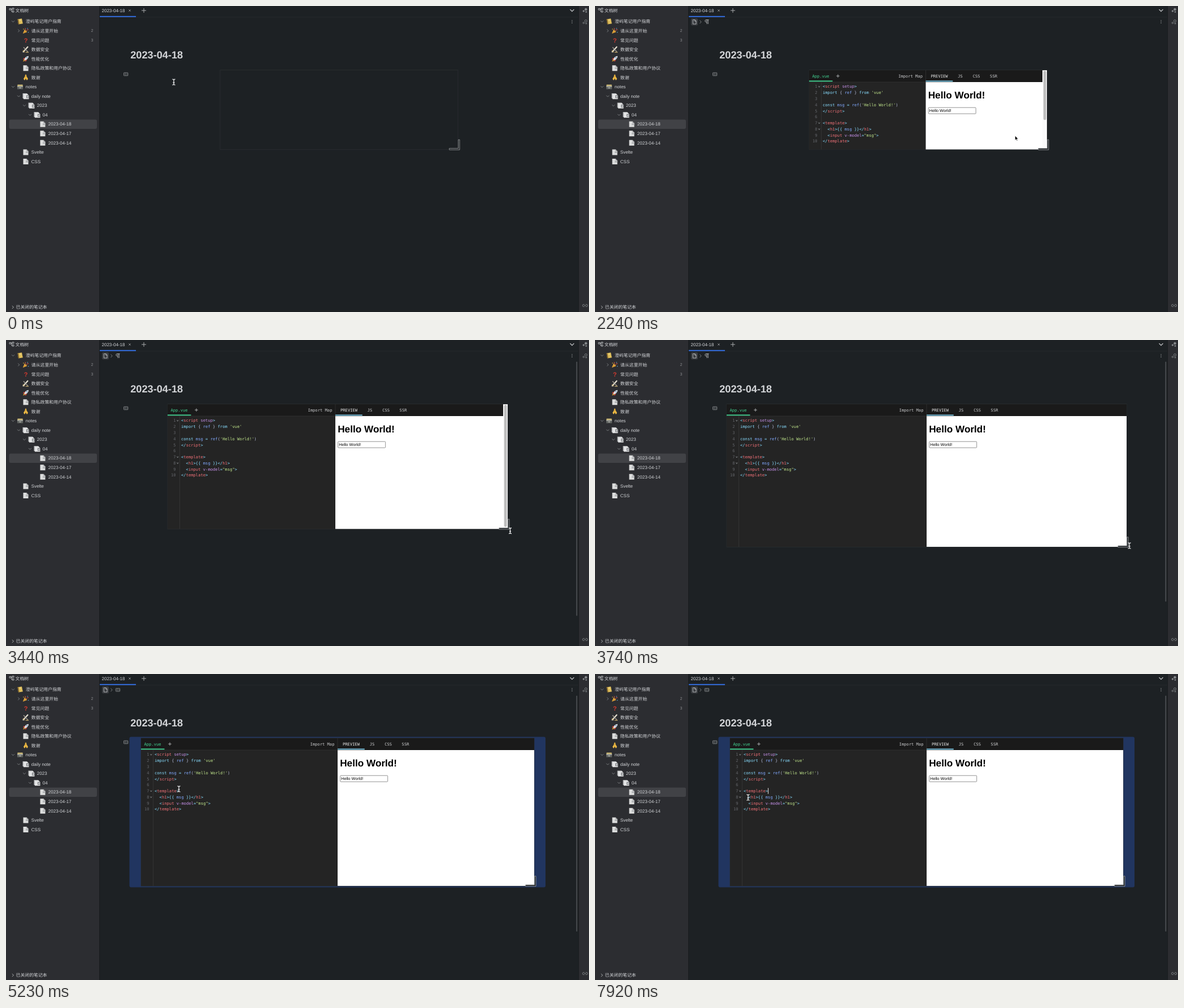
Write an HTML page that moves like this. It is 1032x543 px and loops after 8 s.

```html
<!DOCTYPE html>
<html lang="zh-CN">
<head>
<meta charset="utf-8">
<title>Resizable playground block</title>
<style>
  html, body { margin: 0; width: 100%; height: 100%; overflow: hidden; background: #1d2124; }
  svg { display: block; width: 100%; height: 100%; }
  text {
    font: 8px "Liberation Sans", "Noto Sans CJK SC", "Noto Sans CJK", sans-serif;
    fill: #d3d5d8; white-space: pre; text-rendering: geometricPrecision;
  }
  .mono, .mono text { font: 7.17px "DejaVu Sans Mono", monospace; }
  .line { fill: none; stroke: #b9bbbe; stroke-width: .9; }
  .dim { fill: none; stroke: #85888b; stroke-width: .9; }
</style>
</head>
<body>
<svg viewBox="0 0 1032 543" preserveAspectRatio="none">
  <defs>
    <g id="page">
      <path d="M-4.5-5H1.5L4.5-2V5H-4.5Z" fill="#dcdddd"/>
      <path d="M1.5-5L4.5-2H1.5Z" fill="#8b8d90"/>
      <path d="M0-1H4.5V1.5H0Z" fill="#aeb0b2"/>
    </g>
    <g id="pages">
      <path d="M-5.5-5H2.5V4H-5.5Z" fill="#b9bbbd"/>
      <path d="M-4-4H3L5.5-1V5.2H-4Z" fill="#e2e3e4"/>
      <path d="M1-1.5H5.5V3.5H1Z" fill="#777a7e"/>
      <path d="M2.2-.3H4.5V2.5H2.2Z" fill="#dadbdd"/>
    </g>
    <g id="book">
      <path d="M-4.5-4L3-5.2L4.8 3.8L-3 5.2Z" fill="#dfbf5c"/>
      <path d="M-4.5-4L-3-4.3L-1.4 4.9L-3 5.2Z" fill="#8a6a2c"/>
      <path d="M-1-2L2-2.5" stroke="#f4e2a1"/>
    </g>
    <g id="party">
      <path d="M-5.2 5L-2-2.5L2.6 2Z" fill="#e9b13c"/>
      <path d="M-3.8 1.8L-.8 3.5M-2.5-1L1 2.2" stroke="#b2642c" stroke-width=".8"/>
      <path d="M-1.5-5q2 1 .8 3M1 0q2-3 4-2" fill="none" stroke="#e5574d"/>
      <path d="M2.5-5h1.3v1.3H2.5zM4 2h1.2v1.2H4z" fill="#63b5e8"/>
      <circle cx="-4" cy="-3" r=".8" fill="#e5b73a"/>
    </g>
    <g id="ask"><text y="4" text-anchor="middle" style="font-size:11px;font-weight:700;fill:#d23a2f">?</text></g>
    <g id="safe">
      <path d="M-5 5L4-5" stroke="#e6e1d2" stroke-width="2.2"/>
      <path d="M-4-4L4 4.5" stroke="#a9a398" stroke-width="1.4"/>
      <path d="M-5 1.5L-1.5 5M0 5H5" stroke="#cdb06b" stroke-width="1.2"/>
    </g>
    <g id="rocket">
      <path d="M5-5Q0-5-3 1L-1 3Q5 0 5-5Z" fill="#dfe2e6"/>
      <path d="M-1-2L-4-1L-5 2L-2 0ZM2 1L1 4L-2 5L0 2Z" fill="#d34a3f"/>
      <path d="M-3 1L-1 3L-5 5Z" fill="#efa735"/>
      <circle cx="2" cy="-2" r="1.1" fill="#5a87b4"/>
    </g>
    <g id="thanks">
      <path d="M0-5.3Q1.3-5.3 1.4-2L4 2.5L2 5.3L0 2L-2 5.3L-4 2.5L-1.4-2Q-1.3-5.3 0-5.3Z" fill="#f0bd45"/>
      <path d="M0-4V2" stroke="#bd862a" stroke-width=".6"/>
    </g>
    <g id="box">
      <path d="M-4.5-4H4.5L5-1H-5Z" fill="#d2bd76"/>
      <path d="M-5-1.5H5V4.3H-5Z" fill="#5e625f"/>
      <path d="M-5-1.5H5V.3H-5Z" fill="#a8aaa3"/>
      <path d="M-1.5 2H1.5" stroke="#d8d8d2"/>
    </g>
    <g id="frame" class="dim">
      <rect x="-3.7" y="-2.7" width="7.4" height="5.4" rx=".7"/>
      <path d="M-1-2.5V2.5M-2.8 0H-1M.6-.8H3M.6 1H3" stroke-width=".7"/>
    </g>
  </defs>

  <rect width="1032" height="543" fill="#1d2124"/>
  <rect width="165" height="543" fill="#2c2d31"/>
  <rect x="1014" width="18" height="543" fill="#2c2d31"/>
  <path d="M165.5 0V543M1013.5 0V543" stroke="#191b1e"/>
  <path d="M166 19.8H1013" stroke="#2a2d30" stroke-width=".8"/>
  <rect x="166" y="17.8" width="64" height="1.8" fill="#3575f0"/>
  <g class="line">
    <path d="M6 4.5H9V7H6ZM11 3.8H14V6H11ZM11 8.7H14V11H11ZM9 5.5H11M10 5.5V10H11"/>
    <path d="M10.8 532L13.6 534.5L10.8 537"/>
    <path d="M217.3 6.3L220.7 9.7M220.7 6.3L217.3 9.7" stroke-width=".7"/>
    <path d="M240 8H248M244 4V12"/>
    <path d="M998.5 6L1002 9.5L1005.500 6" stroke-width="1.3"/>
    <path d="M1002 25V31" stroke-dasharray="1.2 1.2"/>
  </g>
  <g class="dim">
    <circle cx="1026.500" cy="6" r="1.900" fill="#85888b"/><circle cx="1022.500" cy="9" r="1.300" fill="#85888b"/><circle cx="1027" cy="10.500" r="1" fill="#85888b"/>
    <circle cx="1026.500" cy="26.500" r="2"/><circle cx="1022.500" cy="30" r="1.300"/><circle cx="1027" cy="31" r="1"/>
    <path d="M1024 529.500H1022.500a2 2 0 0 0 0 4H1024M1026 529.500H1027.500a2 2 0 0 1 0 4H1026M1023 531.500H1027"/>
  </g>
  <text x="16.500" y="10.500" style="font-size:7.900px">文档树</text>
  <text x="17.500" y="537.400" style="font-size:7.900px">已关闭的笔记本</text>
  <text x="169.500" y="10.700">2023-04-18</text>
  <g id="tree"></g>

  <text x="220.200" y="93.200" style="font-size:18.200px;font-weight:700">2023-04-18</text>
  <use href="#frame" x="212.200" y="121"/>
  <g id="crumb">
    <rect x="170" y="22" width="12" height="12.500" rx="2" fill="#3a3d41"/>
    <path class="line" d="M173.300 24.500H177L179 26.500V32H173.300ZM176.800 24.500V27H179"/>
    <path class="dim" d="M185.500 25.500L188 28.200L185.500 31"/>
    <g id="para"><path class="line" d="M201.500 24.500H196.800a2 2 0 0 0 0 4H198M198 24.500V32M200.200 24.500V32"/></g>
    <use id="block" href="#frame" x="198" y="28.200"/>
  </g>

  <rect id="mark" x="218.500" y="111.600" width="736.500" height="267" rx="3" fill="#213560"/>
  <rect id="edge" y="113.700" fill="#1d2124" stroke="#2c2f32" stroke-width=".8"/>
  <g id="panel" class="mono">
    <rect id="head" y="114" height="21" fill="#1a1a1a"/>
    <rect id="code" y="135" fill="#242424"/>
    <path id="rule" stroke="#383838" stroke-width=".7"/>
    <rect id="white" y="135" fill="#fff"/>
    <g id="left"></g>
    <g id="strip">
      <rect x="-8.500" y="135" width="8.500" height="119.500" fill="#fff"/>
      <path d="M0 135V254.500" stroke="#444"/>
    </g>
    <g id="right"></g>
    <rect id="track" y="114" width="8" fill="#fafafa"/>
    <rect id="thumb" y="115" width="4.800" rx="2.400" fill="#bdbdbd"/>
  </g>
  <path id="grip" d="M.7-17.300H3V.7H-15.300V-1.900H.7Z" fill="#1d2124" stroke="#a3a5a7" stroke-width=".8"/>
  <rect id="scroll" x="1009.500" y="38.500" width="1.700" rx=".8" fill="#505356"/>
  <path id="beam" d="M-2.500-5Q0-5 0-3.500Q0-5 2.500-5M0-3.500V3.500M-2.500 5Q0 5 0 3.500Q0 5 2.500 5M-1.500 1H1.500" fill="none" stroke="#e4e5e6" stroke-width="1.300"/>
  <path id="arrow" d="M0 0V8L1.900 6.300L3.200 9.200L4.500 8.600L3.200 5.800H5.700Z" fill="#000" stroke="#fff" stroke-width=".7"/>
</svg>
<script>
const $ = id => document.getElementById(id);

function el(parent, tag, attrs, text) {
  const n = document.createElementNS('http://www.w3.org/2000/svg', tag);
  set(n, attrs);
  if (text) n.textContent = text;
  return parent.appendChild(n);
}
function set(n, attrs) {
  for (const key in attrs) n.setAttribute(key, attrs[key]);
}
const show = (n, on) => { n.style.display = on ? '' : 'none'; };
const move = (n, x, y = 0) => n.setAttribute('transform', `translate(${x} ${y})`);

// Sidebar: depth, icon, label, arrow (v open, > closed), count
const rows = [
  [0, 'book', '澄屿笔记用户指南', 'v'], [1, 'party', '请从这里开始', '>', '2'],
  [1, 'ask', '常见问题', '', '3'], [1, 'safe', '数据安全'], [1, 'rocket', '性能优化'],
  [1, 'page', '隐私政策和用户协议'], [1, 'thanks', '致谢'], [0, 'box', 'notes', 'v'],
  [1, 'pages', 'daily note', 'v'], [2, 'pages', '2023', 'v'], [3, 'pages', '04', 'v'],
  [4, 'page', '2023-04-18'], [4, 'page', '2023-04-17'], [4, 'page', '2023-04-14'],
  [1, 'page', 'Svelte'], [1, 'page', 'CSS']
];
const tree = $('tree');
el(tree, 'rect', { x: 5.5, y: 201.6, width: 155.5, height: 16.4, rx: 3, fill: '#414246' });
rows.forEach(([depth, icon, label, arrow, count], i) => {
  const x = depth * 10, y = 27.4 + i * 16.57;
  if (arrow) {
    const d = arrow === 'v' ? 'M-2.4-1.2L0 1.2L2.4-1.2' : 'M-1.2-2.4L1.2 0L-1.2 2.4';
    move(el(tree, 'path', { d, class: 'dim' }), x + 12.5, y);
  }
  el(tree, 'use', { href: '#' + icon, x: x + 25, y });
  const cjk = label.charCodeAt(0) > 255;
  el(tree, 'text', { x: x + 34.8, y: y + (cjk ? 3 : 2.8), style: cjk ? 'font-size:7.9px' : '' }, label);
  if (count) el(tree, 'text', { x: 152.5, y: y + 2.5, 'text-anchor': 'middle', style: 'font-size:7px;fill:#8b8d90' }, count);
});

// Editor code: color key, then text, parts split by ~
const ink = { c: '#89ddff', r: '#f07178', p: '#c792ea', g: '#c3e88d', b: '#82aaff', w: '#b4bad6' };
const code = [
  'c:<~r:script~p: setup~c:>',
  "c:import~w: { ~b:ref~w: } ~c:from~g: 'vue'",
  '',
  "c:const~b: msg~c: = ~b:ref~w:(~g:'Hello World!'~w:)",
  'c:</~r:script~c:>',
  '',
  'c:<~r:template~c:>',
  'c:  <~r:h1~c:>{{~b: msg ~c:}}</~r:h1~c:>',
  'c:  <~r:input~p: v-model~c:=~g:"msg"~c:>',
  'c:</~r:template~c:>'
];
const COL = 4.317, lineY = i => 142.9 + i * 10.78;
const left = $('left'), right = $('right');
const label = (g, x, y, s, color, anchor = 'start') =>
  el(g, 'text', { x, y, 'text-anchor': anchor, style: 'fill:' + color }, s);

const select = el(left, 'rect', { y: 169.8, height: 11, fill: '#43484a' });
label(left, 5.5, 126.6, 'App.vue', '#42d392');
el(left, 'rect', { x: 0, y: 132.4, width: 41.5, height: 1.8, fill: '#42d392' });
el(left, 'path', { d: 'M48.2 124.2H53.8M51 121.4V127', class: 'line' });
const gutter = el(left, 'path', { stroke: '#3a3a3a', 'stroke-width': .8 });
code.forEach((line, i) => {
  const y = lineY(i) + 2.5;
  label(left, 14.6, y, String(i + 1), '#63656a', 'end');
  const text = el(left, 'text', { x: 24, y });
  if (line) for (const part of line.split('~'))
    el(text, 'tspan', { style: 'fill:' + ink[part[0]] }, part.slice(2));
});
const folds = el(left, 'g', { class: 'dim' });
[0, 6, 7].forEach(i => move(el(folds, 'path', { d: 'M-1.3-1L0 1.4L1.3-1' }), 17.8, lineY(i)));
const caret = el(left, 'rect', { x: 24 + 10 * COL, y: 202.3, width: .9, height: 10.4, fill: '#fff' });

label(right, -5.5, 126.6, 'Import Map', '#c9cacc', 'end');
[['PREVIEW', 9, '#e8e8e8'], ['JS', 56.7], ['CSS', 83.2], ['SSR', 113.6]].forEach(
  ([s, x, color]) => label(right, x, 126.6, s, color || '#c9cacc'));
el(right, 'rect', { x: 0, y: 132.6, width: 47.8, height: 1.6, fill: '#89ddff' });
const result = el(right, 'g', {});
const sans = 'font-family:"Liberation Sans",sans-serif;fill:#000;';
el(result, 'text', { x: 4.2, y: 163.8, style: sans + 'font-size:17.2px;font-weight:700' }, 'Hello World!');
el(result, 'rect', { x: 4.7, y: 180.2, width: 84, height: 11, rx: 1, fill: '#fff', stroke: '#777', 'stroke-width': .8 });
el(result, 'text', { x: 6.3, y: 188.2, style: sans + 'font-size:7.17px' }, 'Hello World!');

// Poses by step: [step, ...values], linear in between
const pointer = [
  [0, 297, 135], [2, 302, 136], [4, 400, 155], [8, 599, 194], [9, 615, 198], [16, 795, 243],
  [18, 799, 246], [20, 799, 246], [21, 839, 312], [25, 946, 365], [27, 948, 372], [29, 939.5, 376],
  [30, 938, 373], [35, 306, 204], [42, 421, 176], [44, 321, 171], [46, 268, 165], [49, 568, 204],
  [50, 568, 204], [53, 271, 219]
];
// center, half width, bottom
const sizes = [
  [0, 589.5, 210.5, 254.5], [20, 589.5, 210.5, 254.5], [21, 587, 248, 303.5], [25, 587, 354, 367],
  [27, 587, 355, 376], [29, 587, 349.5, 381], [31, 587, 348, 376]
];
const selectFrom = { 43: 28, 44: 24, 45: 11, 46: 0, 47: 0, 48: 0, 49: 0 };

function at(keys, k) {
  const j = keys.findIndex(key => key[0] > k);
  if (j < 0) return keys[keys.length - 1].slice(1);
  const a = keys[j - 1], b = keys[j], u = (k - a[0]) / (b[0] - a[0]);
  return a.slice(1).map((v, i) => v + (b[i + 1] - v) * u);
}

function stepAt(t) {
  for (const cut of [7920, 5230, 2390]) if (t >= cut) t += 10;
  return Math.floor(t / 150);
}

function draw(k) {
  const [cx, half, bottom] = at(sizes, k);
  const x0 = cx - half, x1 = cx + half, tall = bottom - 114;
  const bar = bottom < 340 ? 8 : 0, split = x0 + (half * 2 - bar) / 2;
  const body = bottom - 135, ready = k >= 10;

  set($('edge'), { x: x0, width: half * 2, height: tall + .6 });
  show($('panel'), k >= 6);
  set($('head'), { x: x0, width: half * 2 });
  set($('code'), { x: x0, width: split - x0, height: body });
  set($('white'), { x: split, width: x1 - split, height: body });
  set($('rule'), { d: `M${x0} 135H${split}M${split} 114V135` });
  set(gutter, { d: `M21.6 135V${bottom}` });
  move(left, x0);
  move(right, split);
  move($('strip'), split);
  show($('strip'), !ready);
  show(folds, ready);
  show(result, ready);
  show($('track'), bar);
  show($('thumb'), bar);
  set($('track'), { x: x1 - 8, height: tall });
  set($('thumb'), { x: x1 - 6.2, height: tall * tall / 226 });
  move($('grip'), x1, bottom);

  show($('crumb'), k >= 3);
  show($('mark'), k >= 32);
  show($('block'), k >= 32);
  show($('para'), k < 32);
  show($('scroll'), k >= 21);
  set($('scroll'), { height: 476.5 - .8 * (bottom - 303.5) });

  const from = selectFrom[k];
  show(select, from !== undefined);
  if (from !== undefined) set(select, { x: 24 + from * COL, width: (31 - from) * COL });
  show(caret, k >= 50);

  const [px, py] = at(pointer, k);
  const arrow = k > 3 && k < 21 || k > 30 && px > 587;
  show($('arrow'), arrow);
  show($('beam'), !arrow);
  move($(arrow ? 'arrow' : 'beam'), px, py);
}

let last = -1;
function tick() {
  const k = stepAt(performance.now() % 8000);
  if (k !== last) draw(last = k);
  requestAnimationFrame(tick);
}
tick();
</script>
</body>
</html>
```
